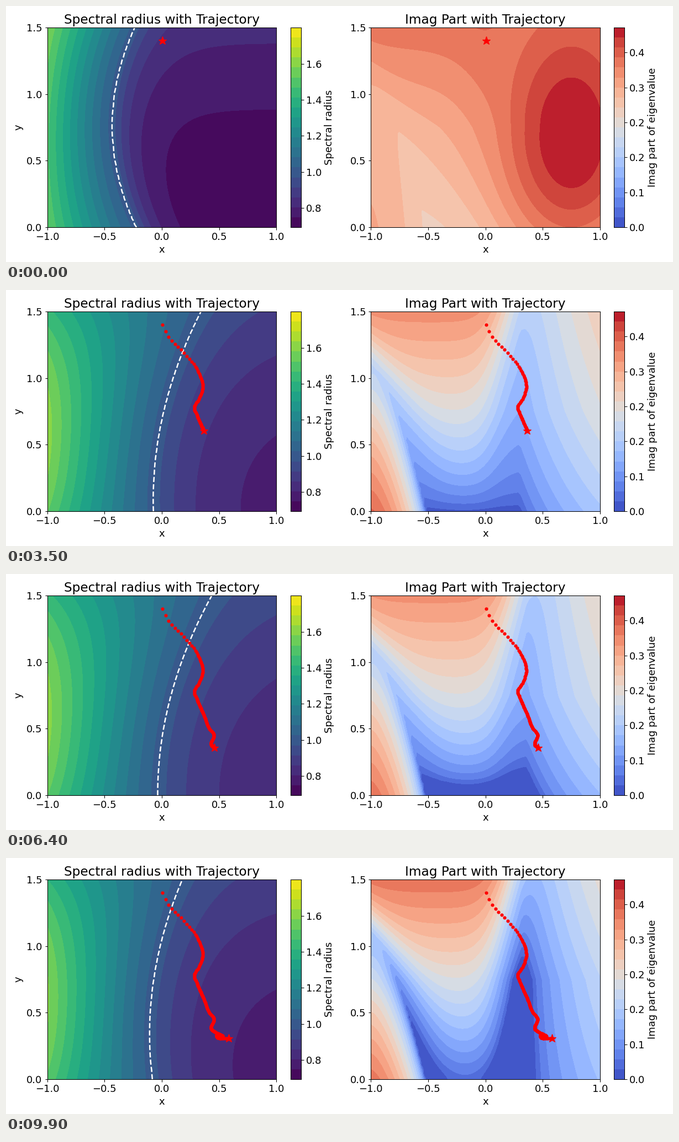
A matplotlib script for the animation above (10 s loop, 1207 px wide and 464 px high).

```python
import numpy as np
import matplotlib.pyplot as plt
from matplotlib.animation import FuncAnimation

W, H, DPI = 1207, 464, 64
FRAMES, INTERVAL = 100, 100
STEPS_PER_FRAME = 2
BANDS = 20
RADIUS_RANGE = (0.693, 1.80)
IMAG_RANGE = (0.0, 0.457)
UNIT_BAND = 5.55  # band position of spectral radius 1


def px(n):
    """Pixels to points."""
    return n * 72 / DPI


plt.rcParams.update({
    "font.family": "DejaVu Sans",
    "axes.linewidth": px(1.02),
    "axes.titlesize": px(23.2), "axes.titlepad": px(7.6),
    "axes.labelsize": px(18), "axes.labelpad": px(5),
    "xtick.labelsize": px(18), "ytick.labelsize": px(18),
    "xtick.major.size": px(4.5), "ytick.major.size": px(4.5),
    "xtick.major.width": px(1.02), "ytick.major.width": px(1.02),
    "xtick.major.pad": px(4.5), "ytick.major.pad": px(4.5),
})

xs = np.linspace(-1, 1, 91)
ys = np.linspace(0, 1.5, 69)
X, Y = np.meshgrid(xs, ys)

# Key poses of the two fields.
# unit: x of the radius-1 line at the bottom, middle and top
# peak, floor: radius bands at the left edge and far right
# trough: squared imaginary part along the valley at bottom, middle and top
# corner, ridge, foot, wall: the warm corner, and the ridge's height, base and right side
# lobe: strength of the warm lobe on the right
STAGES = {
    0: dict(unit=(-.22, -.43, -.235), peak=14.2, floor=.3,
            trough=(135, 165, 215), corner=8, ridge=60, foot=0, wall=0, lobe=1),
    26: dict(unit=(-.05, .03, .37), peak=16.8, floor=1.4,
             trough=(2, 25, 38), corner=17.5, ridge=200, foot=0, wall=0, lobe=0),
    55: dict(unit=(-.12, -.01, .28), peak=15.8, floor=1.6,
             trough=(-6, 15, 24), corner=16.4, ridge=225, foot=4, wall=0, lobe=0),
    73: dict(unit=(.05, .17, .59), peak=17.1, floor=2.2,
             trough=(-8, 24, 28), corner=17.5, ridge=195, foot=0, wall=.12, lobe=0),
    83: dict(unit=(-.145, -.155, .057), peak=15.7, floor=1,
             trough=(-20, 12, 30), corner=16.5, ridge=285, foot=65, wall=-.09, lobe=0),
    99: dict(unit=(-.08, -.07, .18), peak=16.2, floor=1.4,
             trough=(-7, -10, 6), corner=16.8, ridge=275, foot=12, wall=.02, lobe=0),
}


def pose(frame):
    times = list(STAGES)
    k = min(np.searchsorted(times, frame, "right"), len(times) - 1) - 1
    u = (frame - times[k]) / (times[k + 1] - times[k])
    if k == 0:
        u = 1 - (1 - u) ** 2  # quick changes at the start
    a, b = STAGES[times[k]], STAGES[times[k + 1]]
    return {name: (1 - u) * np.array(a[name]) + u * np.array(b[name]) for name in a}


def sigmoid(v):
    return 0.5 + 0.5 * np.tanh(v / 2)


def radius_bands(p):
    """Steady climb left of the radius-1 line, exponential decay right of it."""
    line = np.polyval(np.polyfit([0, .75, 1.5], p["unit"], 2), Y)
    edge = p["peak"] - (3.2 - 5 * p["lobe"]) * ((Y - .6) / .9) ** 2
    climb = np.maximum(line - X, 0) / (line + 1)
    left = UNIT_BAND + (edge - UNIT_BAND) * climb ** 1.1
    far = p["floor"] + 2 * (Y / 1.5) ** 2
    fade = np.exp(-np.maximum(X - line, 0) / (.14 + .16 * p["floor"]))
    right = far + (UNIT_BAND - far) * fade
    return np.where(X < line, left, right)


def imag_bands(p):
    """Root of a discriminant, zero where it is negative."""
    height = (Y / 1.5) ** 1.4
    disc = np.interp(Y, [0, .75, 1.5], p["trough"])
    reach = ((X + 1) / .48) ** 1.5 + Y / 1.1
    disc += p["corner"] ** 2 * np.maximum(1 - reach, 0)
    wall = p["wall"] + .15 * (Y / 1.5) ** 2
    disc += ((p["foot"] + (p["ridge"] - p["foot"]) * height)
             * sigmoid((X + .4 + .4 * Y ** 2) / .1) * sigmoid((wall - X) / .08))
    disc += (1 - p["lobe"]) * (65 + 55 * Y) * np.maximum(X - p["wall"] - .3, 0)
    disc += 240 * p["lobe"] * np.exp(-((X - .75) / .65) ** 2 - ((Y - .6) / .9) ** 2)
    return np.sqrt(np.maximum(disc, 0))


def to_range(bands, limits):
    lo, hi = limits
    return lo + (hi - lo) * np.clip(bands, 0.01, BANDS - 0.01) / BANDS


def smooth(t, knots, values):
    """Cubic Hermite curve through values."""
    slope = np.gradient(values, knots, axis=0)
    i = np.clip(np.searchsorted(knots, t, "right") - 1, 0, len(knots) - 2)
    h = (knots[i + 1] - knots[i])[:, None]
    u = (t - knots[i])[:, None] / h
    return ((1 + 2 * u) * (1 - u) ** 2 * values[i]
            + u * (1 - u) ** 2 * h * slope[i]
            + u * u * (3 - 2 * u) * values[i + 1]
            - u * u * (1 - u) * h * slope[i + 1])


# Turning points of the trajectory: step, x, y
path = np.array([
    (0, .005, 1.40), (2, .06, 1.31), (5, .142, 1.237), (11, .278, 1.105),
    (17, .333, 1.02), (25, .357, .94), (36, .318, .835), (42, .284, .79),
    (52, .31, .715), (70, .365, .607), (86, .41, .507), (99, .455, .452),
    (111, .43, .392), (130, .465, .355), (150, .53, .322), (162, .49, .31),
    (174, .48, .33), (184, .52, .313), (190, .505, .308), (198, .582, .307),
])
track = smooth(np.arange((FRAMES - 1) * STEPS_PER_FRAME + 1), path[:, 0], path[:, 1:])

fig = plt.figure(figsize=(W / DPI, H / DPI), dpi=DPI, facecolor="white")


def place(left, width):
    top, bottom = 39.2, 401
    return fig.add_axes([left / W, 1 - bottom / H, width / W, (bottom - top) / H])


def panel(left, title):
    ax = place(left, 414.7)
    ax.set(xlim=(-1, 1), ylim=(0, 1.5), xlabel="x", title=title,
           xticks=np.arange(-1, 1.1, 0.5), yticks=np.arange(0, 1.6, 0.5))
    dots, = ax.plot([], [], "o", color="red", ms=px(6.2), mew=0, zorder=3)
    star, = ax.plot([], [], "*", color="red", ms=px(15.5), mew=px(1.2), zorder=4)
    return ax, dots, star


def colorbar(left, cmap, limits, ticks, label):
    ax = place(left, 18.2)
    ax.imshow(np.arange(BANDS)[:, None] + 0.5, cmap=cmap, vmin=0, vmax=BANDS,
              origin="lower", aspect="auto", interpolation="nearest",
              extent=(0, 1, *limits))
    ax.set_xticks([])
    ax.yaxis.tick_right()
    ax.yaxis.set_label_position("right")
    ax.set_yticks(ticks, [f"{t:.1f}" for t in ticks])
    ax.set_ylabel(label)


ax_r, dots_r, star_r = panel(74.6, "Spectral radius with Trajectory")
ax_i, dots_i, star_i = panel(660.2, "Imag Part with Trajectory")
ax_r.set_ylabel("y")
colorbar(515.4, "viridis", RADIUS_RANGE, np.arange(0.8, 1.7, 0.2), "Spectral radius")
colorbar(1100.4, "coolwarm", IMAG_RANGE, np.arange(0, 0.41, 0.08),
         "Imag part of eigenvalue")

drawn = []


def fill(ax, z, limits, cmap):
    levels = np.linspace(*limits, BANDS + 1)
    drawn.append(ax.contourf(xs, ys, z, levels=levels, cmap=cmap))


def update(frame):
    while drawn:
        drawn.pop().remove()
    p = pose(frame)
    radius = to_range(radius_bands(p), RADIUS_RANGE)
    fill(ax_r, radius, RADIUS_RANGE, "viridis")
    fill(ax_i, to_range(imag_bands(p), IMAG_RANGE), IMAG_RANGE, "coolwarm")
    drawn.append(ax_r.contour(xs, ys, radius, levels=[1.0], colors="white",
                              linestyles="dashed", linewidths=px(2.5)))
    past = track[:frame * STEPS_PER_FRAME + 1]
    for dots, star in ((dots_r, star_r), (dots_i, star_i)):
        dots.set_data(past[:, 0], past[:, 1])
        star.set_data(past[-1:, 0], past[-1:, 1])
    return []


anim = FuncAnimation(fig, update, frames=FRAMES, interval=INTERVAL,
                     init_func=lambda: [], repeat=True, repeat_delay=0)
plt.show()
```
